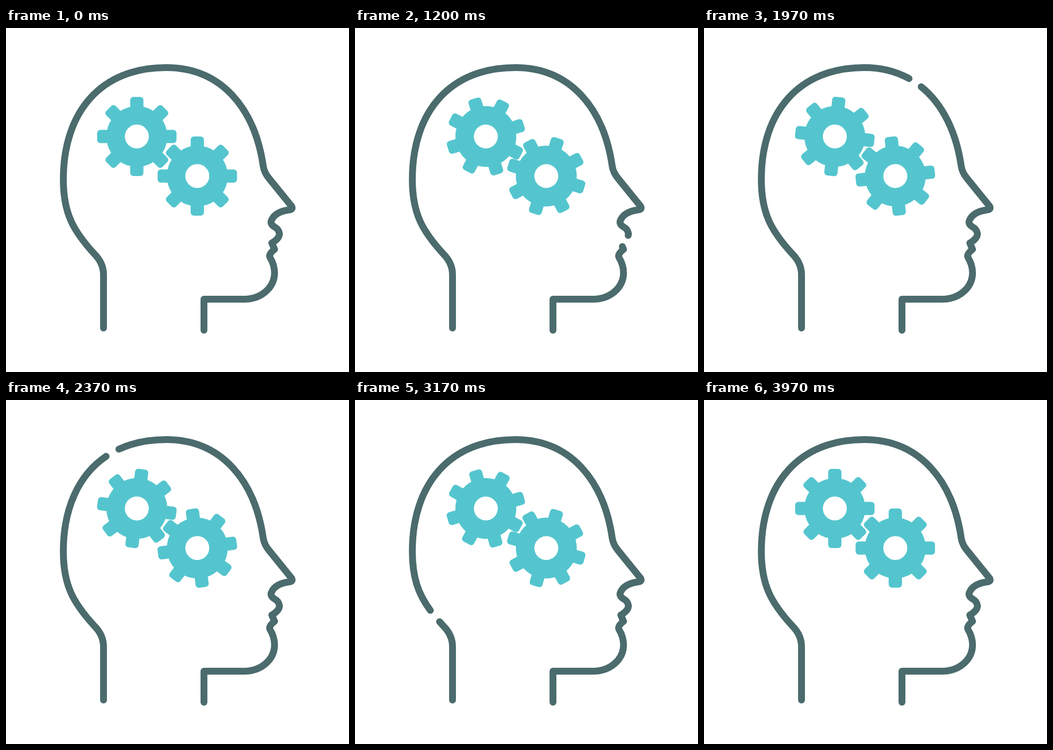
Animation, 700 px wide and 704 px high, one loop 4.01 s. Source, as an HTML page:

```html
<!DOCTYPE html>
<html lang="en">
<head>
<meta charset="utf-8">
<title>Thinking head</title>
<style>
  html, body { margin: 0; width: 100%; height: 100%; overflow: hidden; background: #fff; }
  svg { display: block; width: 700px; height: 704px; }
</style>
</head>
<body>
<svg viewBox="0 0 700 704">
  <defs>
    <rect id="tooth" x="-13.5" y="-81" width="27" height="34" rx="6.5"/>
    <g id="gear" fill="#54c5ce">
      <circle r="43.2" fill="none" stroke="#54c5ce" stroke-width="37.6"/>
    </g>
  </defs>
  <path id="head" fill="none" stroke="#4b6b6d" stroke-width="14" stroke-linecap="round" stroke-linejoin="round"
    d="M404 618.5V555H486C520 555 548 532 548 501Q548 485 539 470Q535 463 548 453L542.5 440
       Q558 431 558 421Q557 412 548 407Q538 401 542 393C548 380 562 374 579 372Q586 371 583 365
       L537 308Q527 296 525 283C508 165 440 81 327 81C195 81 117 170 117 310
       C117 380 138 416 180 462Q199 481 199 505V614"/>
  <use id="left" href="#gear"/>
  <use id="right" href="#gear"/>
</svg>
<script>
const byId = id => document.getElementById(id);
const head = byId('head'), gear = byId('gear'), tooth = byId('tooth');
const LOOP = 4010, FRAMES = 120, GAP = 30, SWING = 39.5;
const length = head.getTotalLength();

for (let i = 0; i < 8; i++) {
  const copy = tooth.cloneNode();
  copy.removeAttribute('id');
  copy.setAttribute('transform', `rotate(${i * 45})`);
  gear.append(copy);
}

// Eased progress of x from a to b
const ease = (x, a, b) => {
  const u = Math.min(1, Math.max(0, (x - a) / (b - a)));
  return u * u * (3 - 2 * u);
};

const place = (id, x, y, angle) =>
  byId(id).setAttribute('transform', `translate(${x} ${y}) rotate(${angle})`);

function draw(time) {
  const step = Math.min(FRAMES - 1, Math.floor((time % LOOP + 4) * 0.03));
  const n = step === FRAMES - 1 ? 0 : step; // the last step shows the starting pose

  const lead = length * ease(n, 0, FRAMES);
  head.setAttribute('stroke-dasharray', `${length} ${GAP}`);
  head.setAttribute('stroke-dashoffset', n ? length + GAP - lead : 0);

  const angle = SWING * (ease(n, 13, 63) - ease(n, 63, FRAMES));
  place('left', 267, 222, -angle);
  place('right', 390.4, 303, angle);
}

const start = performance.now();
function tick() {
  draw(performance.now() - start);
  requestAnimationFrame(tick);
}
tick();
</script>
</body>
</html>
```
